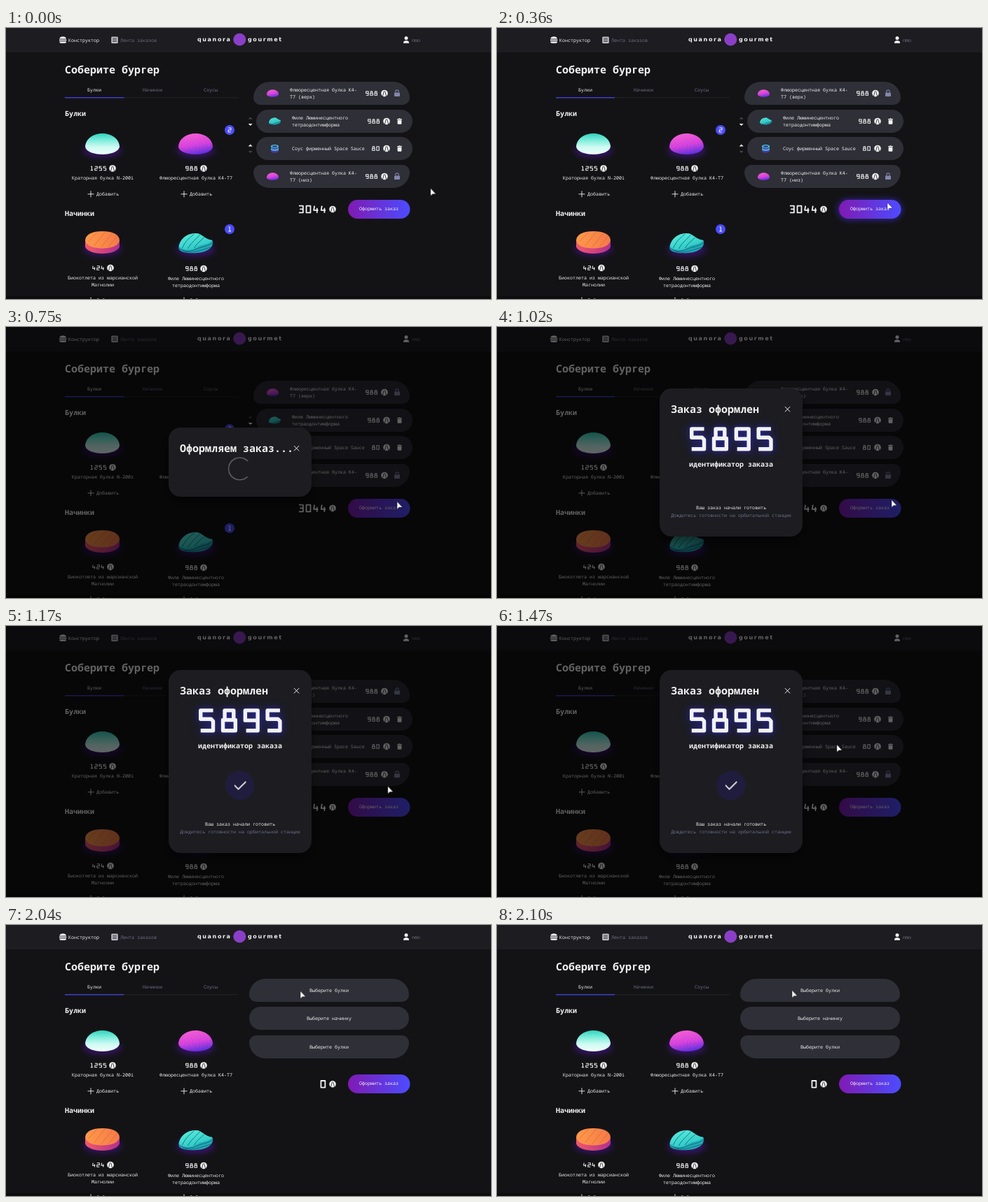
Recreate the animation shown at these times as an HTML page. Size 692 by 388 pixels, loop 2.13 s.

```html
<!DOCTYPE html>
<html lang="ru">
<head>
<meta charset="utf-8">
<title>Burger order</title>
<style>
html, body { margin: 0; width: 100%; height: 100%; overflow: hidden; background: #131316; }
svg { display: block; width: 692px; height: 388px; }
text {
  font: 6.67px 'Noto Sans Mono', 'DejaVu Sans Mono', monospace;
  fill: #f2f2f3; text-rendering: geometricPrecision; white-space: pre;
}
.mid { text-anchor: middle; }
.dim { fill: #6f6f8c; }
.h1 { font-size: 15px; font-weight: 500; }
.h2 { font-size: 10px; font-weight: 600; }
.bold { font-weight: 700; }
.brand { font: bold 8px 'DejaVu Sans', sans-serif; letter-spacing: 1.6px; }
.line { fill: none; stroke: #f2f2f3; }
.num { stroke-width: 1.7; stroke-linejoin: round; }
.pill { fill: #2f2f37; }
.panel { fill: #1c1c21; filter: drop-shadow(0 8px 8px rgba(0,0,0,.5)); }
.big { filter: drop-shadow(0 0 3px rgba(51,51,255,.4)) drop-shadow(0 1px 7px rgba(51,51,255,.4)); }
.soft { filter: blur(4px); }

/* one loop is 2130 ms */
.show { animation: 2130ms step-end infinite; }
.filled { animation-name: filled; }
.empty { animation-name: empty; }
.veil { animation-name: veil; }
.wait { animation-name: wait; }
.short { animation-name: short; }
.tall { animation-name: tall; }
@keyframes filled { 0% { visibility: visible } 91.549%, 100% { visibility: hidden } }
@keyframes empty { 0% { visibility: hidden } 91.549%, 100% { visibility: visible } }
@keyframes veil { 0% { visibility: hidden } 19.718% { visibility: visible } 91.549%, 100% { visibility: hidden } }
@keyframes wait { 0% { visibility: hidden } 19.718% { visibility: visible } 45.07%, 100% { visibility: hidden } }
@keyframes short { 0% { visibility: hidden } 45.07% { visibility: visible } 49.296%, 100% { visibility: hidden } }
@keyframes tall { 0% { visibility: hidden } 49.296% { visibility: visible } 91.549%, 100% { visibility: hidden } }

.hover { animation: hover 2130ms linear infinite; }
@keyframes hover { 0%, 10% { opacity: 0 } 15%, 19.718% { opacity: .5 } 25%, 100% { opacity: 0 } }
.spin { animation: spin 1065ms linear infinite; }
@keyframes spin { from { transform: rotate(151.5deg) } to { transform: rotate(511.5deg) } }
.turn { animation: turn 2130ms linear infinite; }
.back { animation-direction: reverse; }
@keyframes turn { to { transform: rotate(360deg) } }
.cursor { animation: cursor 2130ms linear infinite; }
@keyframes cursor {
  0% { transform: translate(606px, 229.5px); animation-timing-function: ease-out }
  16.901% { transform: translate(557px, 250px) }
  35.211% { transform: translate(558px, 250px) }
  47.887%, 50.704% { transform: translate(563px, 247.5px) }
  69.014% { transform: translate(485px, 170px) }
  87.324% { transform: translate(417px, 98px) }
  98.592%, 100% { transform: translate(421px, 93.5px) }
}
</style>
</head>
<body>
<svg id="stage" viewBox="0 0 692 388">
  <defs>
    <linearGradient id="buy"><stop stop-color="#801ab3"/><stop offset="1" stop-color="#4c4cff"/></linearGradient>
    <linearGradient id="mint" x2="0" y2="1"><stop stop-color="#2fd3bd"/><stop offset=".35" stop-color="#83eedd"/><stop offset=".65" stop-color="#cffaf3"/><stop offset="1" stop-color="#effffc"/></linearGradient>
    <linearGradient id="pink" x1=".3" x2=".6" y2="1"><stop stop-color="#f45fd2"/><stop offset=".55" stop-color="#d541dc"/><stop offset="1" stop-color="#5b30dd"/></linearGradient>
    <linearGradient id="meat"><stop stop-color="#ff9a4a"/><stop offset="1" stop-color="#f47a48"/></linearGradient>
    <linearGradient id="side"><stop stop-color="#f2586c"/><stop offset="1" stop-color="#b32f8e"/></linearGradient>
    <linearGradient id="sea" x2=".6" y2="1"><stop stop-color="#5df0df"/><stop offset="1" stop-color="#2cc6c4"/></linearGradient>
    <path id="dome" d="M-24.5 4C-24-8-12-15 0-15S24-8 24.5 4C23.5 11 12 15 0 15S-23.5 11-24.5 4Z"/>
    <g id="bunA"><use href="#dome" fill="url(#mint)"/><g class="seeds" fill="#d9fff8"/></g>
    <g id="bunB"><use href="#dome" fill="url(#pink)"/><g class="seeds" fill="#ff9df0"/></g>
    <g id="patty">
      <path d="M-24.5-3V6C-23 12-12 16 0 16S23 12 24.5 6V-3Z" fill="url(#side)"/>
      <path d="M-24.5-3C-24-12-14-16 0-16S24-12 24.5-3C23 5 13 8.5 0 8.5S-23 5-24.5-3Z" fill="url(#meat)"/>
      <path class="line" d="M-20-1L-8-14M-12 5L4-15M-2 7L14-13M9 6L21-9" style="stroke:#d95e3c;stroke-width:.6"/>
    </g>
    <g id="fish">
      <path d="M-24 6C-23-4-14-14 0-14C10-14 11-6 24-4C27 5 18 13 2 14C-12 15-25 13-24 6Z" fill="#22a9b4"/>
      <path d="M-24 5C-22-5-14-14 0-14C10-14 11-6 24-4C19 3 9 1 2 6S-16 11-24 5Z" fill="url(#sea)"/>
      <path class="line" d="M-19 7C-15-2-9-8-2-13M-11 8C-8 1 0-5 6-12M-2 7C1 1 7-3 12-8M-23 8C-10 16 0 8 8 6S19 3 25-1M-18 11C-6 16 4 11 22 6" style="stroke:#0b5f72;stroke-width:.8"/>
    </g>
    <g id="pot">
      <path d="M-5.5-3V4C-4 7 4 7 5.5 4V-3Z" fill="#5533a8"/>
      <path d="M-5.5-1C-2 2 2 2 5.5-1V2C2 4-2 4-5.5 2Z" fill="#36b9c8"/>
      <ellipse cy="-3" rx="5.5" ry="2.6" fill="#48d7d5"/>
      <ellipse cy="-3" rx="3.6" ry="1.5" fill="#3a3fa8"/>
    </g>
    <g id="coin">
      <circle r="4.8" fill="#f2f2f3"/>
      <path class="line" d="M-.7-3.2L-2.6 4.6M.7-3.2L2.6 4.6" style="stroke:#1a1a1e;stroke-width:.8"/>
    </g>
    <g id="lock" fill="#8585ad">
      <rect x="-4" y="-1" width="8" height="5.5" rx="1"/>
      <path class="line" d="M-2.2-1V-2.5A2.2 2.2 0 0 1 2.2-2.5V-1" style="stroke:#8585ad;stroke-width:1.1"/>
    </g>
    <path id="bin" d="M-3.4-3.6H-1.2L-.7-4.3H.7L1.2-3.6H3.4V-2.5H-3.4ZM-2.9-1.9H2.9V3.2Q2.9 4.2 1.9 4.2H-1.9Q-2.9 4.2-2.9 3.2Z" fill="#f2f2f3"/>
    <path id="cross" class="line" d="M-3.6-3.6L3.6 3.6M3.6-3.6L-3.6 3.6"/>
    <path id="arrow" d="M-3 1.5L0-1.5L3 1.5Z"/>
  </defs>
</svg>
<script>
const GLYPHS = {
  0: 'M.8.8H6.4V9.9H.8Z',
  1: 'M1.2.8H3.8V9.9M.8 9.9H6.6',
  2: 'M.8.8H6.4V5.3H.8V9.9H6.4',
  3: 'M.8.8H6.4V9.9H.8M2 5.3H6.4',
  4: 'M1.8.8L.8 6.6H6.8M5.2 3.6V10.2',
  5: 'M6.4.8H.8V4.7H5.5L6.4 5.7V9.9H.8',
  8: 'M1.6.8H5.6V5.1H6.4V9.9H.8V5.1H1.6ZM1.6 5.1H5.6',
  9: 'M6.4 5.3H.8V.8H6.4V9.9H1.2'
};

const text = (x, y, s, cls = '') => `<text x="${x}" y="${y}" class="${cls}">${s}</text>`;
const use = (id, x, y, scale = 1, extra = '') =>
  `<use href="#${id}" transform="translate(${x} ${y}) scale(${scale})" ${extra}/>`;
const rect = (x, y, w, h, r, extra = '') =>
  `<rect x="${x}" y="${y}" width="${w}" height="${h}" rx="${r}" ${extra}/>`;
const show = (name, body) => `<g class="show ${name}">${body}</g>`;

// x is the left edge, y the vertical centre
function number(x, y, s, scale = .62) {
  const digits = [...s].map((d, i) => `<path transform="translate(${i * 10})" d="${GLYPHS[d]}"/>`).join('');
  return `<g class="line num" transform="translate(${x} ${y}) scale(${scale}) translate(1 -5.35)">${digits}</g>`;
}
const price = (x, y, s, coinX) => number(x, y, s) + use('coin', coinX, y);

function addButton(x, y) {
  return `<path class="line" stroke-width=".9" d="M${x - 4.5} ${y}h9M${x} ${y - 4.5}v9"/>` + text(x + 8, y + 2.3, 'Добавить');
}

function card(cx, cy, food, cost, costX, coinX, lines, addY) {
  const priceY = cy + (cy > 200 ? 36.5 : 35);
  return `<ellipse class="soft" cx="${cx}" cy="${cy + 9}" rx="27" ry="10" fill="#4a1596" opacity=".65"/>` +
    use(food, cx, cy) + price(costX, priceY, cost, coinX) +
    lines.map((s, i) => text(cx + .5, priceY + 16 + i * 10, s, 'mid')).join('') +
    addButton(cx - 16.5, addY);
}

const badge = (y, n) => `<circle cx="319" cy="${y}" r="7" fill="#4c4cff"/>` + number(316.1, y, n, .65);

// end pill with unequal upper and lower corner radii
function endPill(x, y, w, top, bottom) {
  const h = 33, arc = (r, dx, dy) => `a${r} ${r} 0 0 1 ${dx} ${dy}`;
  return `<path class="pill" d="M${x + top} ${y}h${w - 2 * top}${arc(top, top, top)}v${h - top - bottom}` +
    `${arc(bottom, -bottom, bottom)}h${2 * bottom - w}${arc(bottom, -bottom, -bottom)}v${top + bottom - h}${arc(top, top, -top)}z"/>`;
}
const midPill = (x, y, w) => rect(x, y, w, 33, 16.5, 'class="pill"');

function bunRow(y, top, bottom, place) {
  const c = y + 16.5;
  return endPill(353, y, 223, top, bottom) + use('bunB', 380.5, c, .35) +
    text(405, c - 2.4, 'Флюоресцентная булка K4-') + text(405, c + 7.4, `T7 (${place})`) +
    price(512.5, c, '988', 540) + use('lock', 558, c);
}

function fillingRow(y, food, scale, lines, cost, costX, canRise) {
  const c = y + 16.5, white = 'fill="#f2f2f3"', grey = 'fill="#44444f"';
  const first = lines.length > 1 ? c - 2.6 : c + 2;
  return midPill(357, y, 223) + use(food, 383.5, c, scale) +
    lines.map((s, i) => text(408, first + i * 10, s)).join('') +
    price(costX, c, cost, 543) + use('bin', 561.5, c) +
    use('arrow', 348.7, c - 4.5, 1, canRise ? white : grey) +
    use('arrow', 348.7, c + 5, '1 -1', canRise ? grey : white);
}

const buyButton = y => rect(488, y, 88.5, 27, 13.5, 'fill="url(#buy)"') + text(532, y + 15.4, 'Оформить заказ', 'mid');

const header = rect(0, 0, 692, 35, 0, 'fill="#1c1c21"') +
  `<path fill="#f2f2f3" d="M76.3 15.5C76.3 11 86 11 86 15.5ZM76 16.5H86.3V18.3H76ZM76.3 19.3H86V20Q86 21.8 84 21.8H78.3Q76.3 21.8 76.3 20Z"/>` +
  text(89, 19.5, 'Конструктор') +
  rect(150.3, 12.5, 9.4, 9.4, 1.2, 'fill="#c4c4cc"') +
  `<path class="line" style="stroke:#1c1c21;stroke-width:.9" d="M152 15h6M152 17.2h6M152 19.4h6"/>` +
  text(163, 19.5, 'Лента заказов', 'dim') +
  text(273, 18.7, 'quanora', 'brand') + text(345, 18.7, 'gourmet', 'brand') +
  `<circle cx="333.3" cy="16.5" r="9" fill="#8b3fc6"/>` +
  `<circle cx="571" cy="14.6" r="2.5" fill="#f2f2f3"/><path fill="#f2f2f3" d="M567 21.8V20.5C567 17 575 17 575 20.5V21.8Z"/>` +
  text(579, 19.5, 'nmo', 'dim');

const menu = text(84, 65.2, 'Соберите бургер', 'h1 bold') +
  text(126, 91.2, 'Булки', 'mid') + text(209, 91.2, 'Начинки', 'mid dim') + text(292, 91.2, 'Соусы', 'mid dim') +
  rect(84, 99.3, 248, .9, 0, 'fill="#25252c"') + rect(84, 99.2, 84, 1.1, 0, 'fill="#4c4cff"') +
  text(84, 126, 'Булки', 'h2') + text(84, 268.7, 'Начинки', 'h2') +
  card(137.5, 166, 'bunA', '1255', 119.5, 152, ['Краторная булка N-200i'], 237.8) +
  card(270.5, 166, 'bunB', '988', 255.5, 282, ['Флюоресцентная булка K4-T7'], 237.8) +
  card(137.5, 307, 'patty', '424', 122.5, 149, ['Биокотлета из марсианской', 'Магнолии'], 390) +
  card(270.5, 308, 'fish', '988', 255.5, 282, ['Филе Люминесцентного', 'тетраодонтимформа'], 390);

const filled = badge(146, '2') + badge(288, '1') +
  bunRow(77, 23, 10, 'верх') +
  fillingRow(117, 'fish', .35, ['Филе Люминесцентного', 'тетраодонтимформа'], '988', 515.5, false) +
  fillingRow(156, 'pot', 1, ['Соус фирменный Space Sauce'], '80', 521.5, true) +
  bunRow(196, 10, 23, 'низ') +
  number(416, 259.5, '3044', 1.06) + use('coin', 466, 259.5) +
  `<g class="hover">${rect(486, 245, 92, 30, 15, 'fill="#4a35ff" class="soft"')}</g>` + buyButton(246);

const empty = endPill(347, 77, 228, 23, 10) + midPill(347, 117, 228) + endPill(347, 158, 228, 10, 23) +
  ['Выберите булки', 'Выберите начинку', 'Выберите булки'].map((s, i) => text(461, [96, 135.7, 177][i], s, 'mid')).join('') +
  number(447.5, 227.8, '0', 1.06) + use('coin', 466, 227.8) + buyButton(214);

const panel = (y, h, title) => rect(232, y, 204, h, 17, 'class="panel"') +
  text(248, y + 35, title, 'h1 bold') + use('cross', 414.5, y + 29.7);

const waiting = panel(144, 99, 'Оформляем заказ...') +
  `<g transform="translate(333.5 203)"><circle class="line spin" r="16" stroke-dasharray="75.4 25.1" opacity=".55"/></g>`;

const done = (y, h) => panel(y, h, 'Заказ оформлен') +
  `<g class="big">${number(272, y + 72.3, '5895', 3.18)}</g>` +
  text(334, y + 112, 'идентификатор заказа', 'mid h2') +
  text(334, y + h - 39.4, 'Ваш заказ начали готовить', 'mid') +
  text(334, y + h - 27.6, 'Дождитесь готовности на орбитальной станции', 'mid dim');

const blob = 'M-20-3C-19-15-9-21 2-20S20-12 21 1S12 20 0 21S-21 9-20-3Z';
const tick = `<g transform="translate(334 228.5)" fill="#261c66">
  <path class="turn" d="${blob}" opacity=".25"/><path class="turn back" d="${blob}" opacity=".22"/>
  <path class="line" stroke-width="1.8" stroke-linecap="round" stroke-linejoin="round" d="M-7.5 0L-2.5 5.2L7.8-5.2"/></g>`;

const cursor = `<path class="cursor" d="M0 0V10.4L3 8H7.4Z" fill="#fff" stroke="#111" stroke-width=".4"/>`;

const stage = document.getElementById('stage');
stage.insertAdjacentHTML('beforeend',
  rect(0, 0, 692, 388, 0, 'fill="#131316"') + rect(0, 384, 692, 4, 0, 'fill="#0d0d0f"') +
  header + menu + show('filled', filled) + show('empty', empty) +
  show('veil', rect(0, 0, 692, 388, 0, 'opacity=".6"')) +
  show('wait', waiting) + show('short', done(88, 212)) + show('tall', done(63, 262) + tick) + cursor);

// seeds spread over the domes on a golden-angle spiral
const seeds = Array.from({ length: 46 }, (_, i) => {
  const r = Math.sqrt(i / 46), a = i * 2.4;
  return `<circle cx="${(21 * r * Math.cos(a)).toFixed(1)}" cy="${(11 * r * Math.sin(a) - 1).toFixed(1)}" r=".45" opacity=".6"/>`;
}).join('');
document.querySelectorAll('.seeds').forEach(g => { g.innerHTML = seeds; });
</script>
</body>
</html>
```
